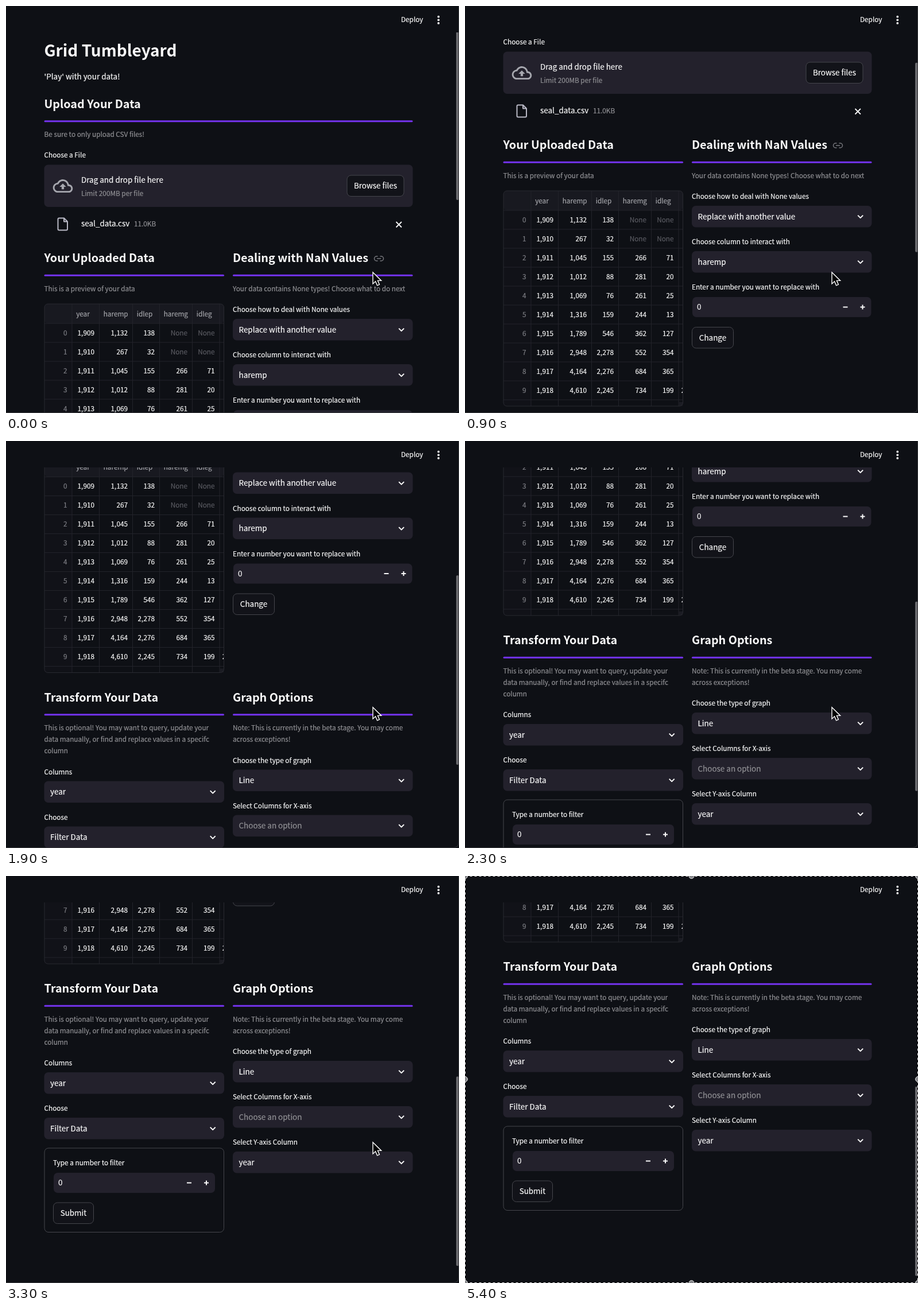
Write an HTML page that moves like this. It is 789x709 px and loops after 5.5 s.

```html
<!DOCTYPE html>
<html lang="en">
<head>
<meta charset="utf-8">
<title>Data app</title>
<style>
  html, body { margin: 0; width: 100%; height: 100%; overflow: hidden; background: #0e1015; }
  svg { display: block; }
  text { font-family: "Noto Sans CJK JP", "Noto Sans CJK SC", "Noto Sans CJK", sans-serif; white-space: pre; }
</style>
</head>
<body>
<svg id="stage" width="789" height="709" viewBox="0 0 789 709"></svg>
<script>
const BG = '#0e1015', PANEL = '#23212c', WHITE = '#fafafa', GRAY = '#919195', EDGE = '#45464c', PURPLE = '#7433ee';
const SMALL = 11.78, BODY = 13.46, HEAD = 19.8, TITLE = 28;
const LEFT = 66.5, RIGHT = 395, COLUMN = 313.5;

// Text is placed by the middle of its capitals.
function text(x, y, content, { size = SMALL, color = WHITE, anchor = 'start', bold = false } = {}) {
  const weight = bold ? 'font-weight="700"' : `stroke="${color}" stroke-width=".2"`;
  return `<text x="${x}" y="${y + size * 0.37}" font-size="${size}" fill="${color}" text-anchor="${anchor}" ${weight}>${content}</text>`;
}
const rect = (x, y, w, h, fill, r = 0, stroke = 'none') =>
  `<rect x="${x}" y="${y}" width="${w}" height="${h}" rx="${r}" fill="${fill}" stroke="${stroke}"/>`;
const line = (d, color = WHITE, width = 2) =>
  `<path d="${d}" fill="none" stroke="${color}" stroke-width="${width}" stroke-linejoin="round"/>`;

const caption = (x, y, content) => text(x, y, content, { color: GRAY });

const heading = (x, y, content, width = COLUMN) =>
  text(x, y, content, { size: HEAD, bold: true }) + rect(x, y + 28.7, width, 3, PURPLE, 1.5);

const button = (x, y, w, label) =>
  rect(x + .5, y + .5, w - 1, 36.5, '#121319', 7, EDGE) +
  text(x + w / 2, y + 18.7, label, { size: BODY, anchor: 'middle' });

const select = (x, y, label, value, color = WHITE) =>
  text(x, y - 16, label) +
  rect(x, y, COLUMN, 37.5, PANEL, 7) +
  text(x + 10.5, y + 18.7, value, { size: BODY, color }) +
  line(`M${x + 289.2} ${y + 16.6}l4.5 4.5 4.5-4.5`);

const numberInput = (x, y, w, label) =>
  text(x - 1, y - 17, label) +
  rect(x, y, w, 35, PANEL, 7) +
  text(x + 8, y + 17.5, '0', { size: BODY }) +
  line(`M${x + w - 49} ${y + 17.5}h8M${x + w - 19} ${y + 17.5}h8m-4-4v8`);

function table() {
  const top = 519, bottom = 894, headerEnd = 553, rowHeight = 33;
  const lines = [115, 162.5, 220.5, 267.5, 324.5, 372];
  const names = ['year', 'haremp', 'idlep', 'haremg', 'idleg'];
  const rows = [
    ['1,132', 138, 'None', 'None'], [267, 32, 'None', 'None'], ['1,045', 155, 266, 71],
    ['1,012', 88, 281, 20], ['1,069', 76, 261, 25], ['1,316', 159, 244, 13],
    ['1,789', 546, 362, 127], ['2,948', '2,278', 552, 354], ['4,164', '2,276', 684, 365],
    ['4,610', '2,245', 734, 199]
  ];
  let out = rect(67, top, 312.5, 34, '#181920', 6) + rect(67, headerEnd, 48, 340, '#111218');
  let grid = lines.map(x => `M${x} ${top}V${bottom}`).join('');
  names.forEach((name, i) => out += text(lines[i] + 7.2, 536.5, name, { color: '#a3a4a9' }));
  rows.forEach((row, i) => {
    const y = headerEnd + 16.5 + i * rowHeight;
    grid += `M67 ${headerEnd + i * rowHeight}h312.5`;
    out += text(106.5, y, i, { color: '#7d7e84', anchor: 'end' });
    ['1,' + (909 + i), ...row].forEach((value, c) =>
      out += text(lines[c + 1] - 8.5, y, value, { color: value === 'None' ? '#595a61' : WHITE, anchor: 'end' }));
  });
  grid += `M67 ${headerEnd + 10 * rowHeight}h312.5`;
  return out + line(grid, '#22232a', 1) +
    `<svg x="376" y="850" width="3.5" height="30">${text(.7, 16.5, '2,2')}</svg>` +
    rect(372.5, 887, 6.5, 6.5, '#1b1c23') +
    rect(67, top, 312.5, bottom - top, 'none', 6, '#292a31');
}

const cloud = `<path transform="translate(81.7 296.3) scale(1.44)" fill="#a6a7ae" fill-rule="evenodd" d="M19.35 10.04C18.67 6.59 15.64 4 12 4 9.11 4 6.6 5.64 5.35 8.04 2.34 8.36 0 10.91 0 14c0 3.31 2.69 6 6 6h13c2.76 0 5-2.24 5-5 0-2.64-2.05-4.78-4.65-4.96zM19 18H6c-2.21 0-4-1.79-4-4 0-2.05 1.53-3.76 3.56-3.97l1.07-.11.5-.95C8.08 7.14 9.94 6 12 6c2.62 0 4.88 1.86 5.39 4.43l.3 1.5 1.53.11c1.56.1 2.78 1.41 2.78 2.96 0 1.65-1.35 3-3 3zM8 13h2.55v3h2.9v-3H16l-4-4z"/>`;

const upload =
  text(LEFT, 77.5, 'Grid Tumbleyard', { size: TITLE, bold: true }) +
  text(LEFT, 123, "'Play' with your data!", { size: BODY }) +
  heading(LEFT, 170.5, 'Upload Your Data', 642) +
  caption(LEFT, 224, 'Be sure to only upload CSV files!') +
  text(LEFT, 260, 'Choose a File') +
  rect(LEFT, 276.5, 642, 73.5, PANEL, 7) + cloud +
  text(131, 303.5, 'Drag and drop file here', { size: BODY }) +
  caption(131, 327, 'Limit 200MB per file') +
  button(593.5, 294.5, 100, 'Browse files') +
  line('M101 369.5h-8.5q-2 0-2 2v17q0 2 2 2h12.500q2 0 2-2v-13zv6h6', '#b9b9c6') +
  text(131, 379.5, 'seal_data.csv', { size: BODY }) +
  caption(223, 380, '11.0KB') +
  line('M679.500 376l9.500 9.500m0-9.500l-9.500 9.500', WHITE, 1.8);

const preview =
  heading(LEFT, 439, 'Your Uploaded Data') +
  caption(LEFT, 492.5, 'This is a preview of your data') +
  table();

const cleaning =
  heading(RIGHT, 439, 'Dealing with NaN Values') +
  line('M647.500 436h-2a4 4 0 0 0 0 8h2m4-8h2a4 4 0 0 1 0 8h-2m-5.500-4h7', '#77787d', 1.5) +
  caption(RIGHT, 492.5, 'Your data contains None types! Choose what to do next') +
  select(RIGHT, 545, 'Choose how to deal with None values', 'Replace with another value') +
  select(RIGHT, 624, 'Choose column to interact with', 'haremp') +
  numberInput(396, 704, 311.5, 'Enter a number you want to replace with') +
  button(RIGHT, 756, 73, 'Change');

const transform =
  heading(LEFT, 937, 'Transform Your Data') +
  caption(LEFT, 990.5, 'This is optional! You may want to query, update your') +
  caption(LEFT, 1010.5, 'data manually, or find and replace values in a specifc') +
  caption(LEFT, 1030.5, 'column') +
  select(LEFT, 1083, 'Columns', 'year') +
  select(LEFT, 1162, 'Choose', 'Filter Data') +
  rect(67, 1215, 312.5, 146.5, 'none', 7, EDGE) +
  numberInput(83, 1258, 281, 'Type a number to filter') +
  button(82, 1309.5, 71, 'Submit');

const graph =
  heading(RIGHT, 937, 'Graph Options') +
  caption(RIGHT, 990.5, 'Note: This is currently in the beta stage. You may come') +
  caption(RIGHT, 1010.5, 'across exceptions!') +
  select(RIGHT, 1063, 'Choose the type of graph', 'Line') +
  select(RIGHT, 1142, 'Select Columns for X-axis', 'Choose an option', GRAY) +
  select(RIGHT, 1221, 'Select Y-axis Column', 'year');

const header =
  rect(0, 0, 789, 46, BG) + text(688, 23.5, 'Deploy') +
  [18.7, 24.3, 29.9].map(y => `<circle cx="753.3" cy="${y}" r="1.9" fill="${WHITE}"/>`).join('');

const beam = 'M635.500 457.500q4.500 0 4.500 3.500q0-3.500 4.500-3.500M640 460v14M635.500 477q4.500 0 4.500-3.500q0 3.500 4.500 3.500M637.500 468.500h5';

const handles = [0, 394.5, 789].flatMap(x => [0, 354, 709].map(y => [x, y]))
  .filter(([x, y]) => x !== 394.5 || y !== 354)
  .map(([x, y]) => `<circle cx="${x}" cy="${y}" r="4.500" fill="#85868a" stroke="#e4e4e4"/>`).join('');

document.getElementById('stage').innerHTML =
  rect(0, 0, 789, 709, BG) +
  `<g id="page">${upload + preview + cleaning + transform + graph}</g>` +
  `<g id="thumb">${rect(784, 8, 4.5, 330, '#69696d', 2.2)}</g>` +
  header +
  line('M0 708.5H779Q788.5 708.5 788.5 699V0', '#36373b', 1) +
  `<path id="arrow" d="M639 464v20l4.600-4.200 3 7 3.800-1.700-3-6.700h6.200z" fill="#000" stroke="#fff" stroke-width="1.4"/>` +
  `<g id="beam">${line(beam, '#fff', 3.4) + line(beam, '#111', 1.2)}</g>` +
  `<g id="selection">${rect(.5, .5, 788, 708, 'none', 0, '#000') +
    '<rect x=".5" y=".5" width="788" height="708" fill="none" stroke="#eee" stroke-dasharray="4 4"/>' + handles}</g>`;

const [page, thumb, arrow, beamCursor, selection] =
  ['page', 'thumb', 'arrow', 'beam', 'selection'].map(id => document.getElementById(id));

// Three flicks of the wheel: [time, scroll offset]
const scrollPath = [
  [0, 0], [100, 6], [200, 24], [400, 80], [600, 132], [900, 197], [1200, 244], [1400, 270],
  [1500, 306], [1700, 405], [1900, 490.5], [2100, 550], [2400, 610], [2700, 641],
  [2900, 641], [3000, 653.5], [3200, 722], [3500, 779], [5500, 779]
];
function scrollAt(t) {
  const i = scrollPath.findIndex(([end]) => end > t);
  const [t0, s0] = scrollPath[i - 1], [t1, s1] = scrollPath[i];
  return s0 + (s1 - s0) * (t - t0) / (t1 - t0);
}

const show = (element, visible) => element.setAttribute('visibility', visible ? 'visible' : 'hidden');

function draw() {
  const t = Math.floor(performance.now() % 5500 / 100) * 100; // ten pictures a second
  const scroll = scrollAt(t);
  page.setAttribute('transform', `translate(0 ${-scroll})`);
  thumb.setAttribute('transform', `translate(0 ${scroll * 0.4605})`);
  show(arrow, t < 3700);
  show(beamCursor, t >= 3700 && t < 4400);
  show(selection, t >= 4400);
  requestAnimationFrame(draw);
}
draw();
</script>
</body>
</html>
```
